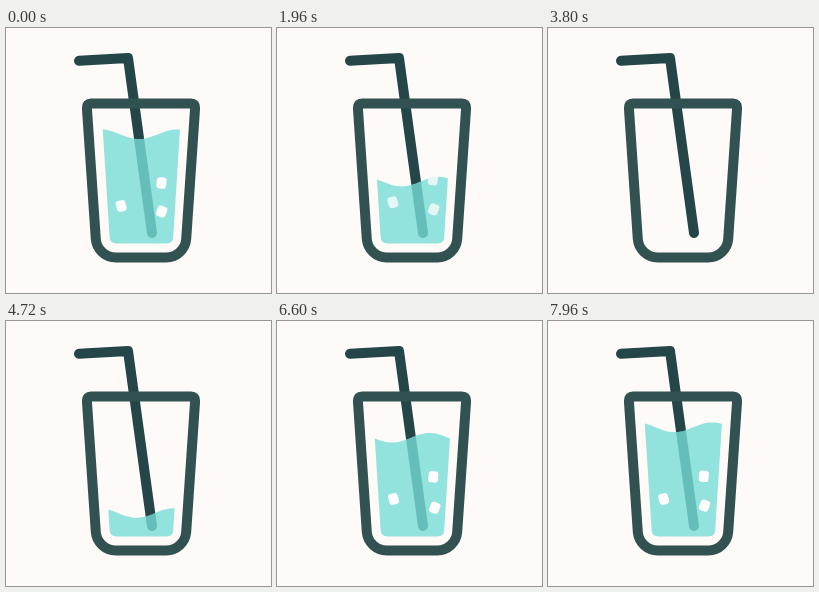
Recreate the animation shown at these times as an HTML page. Size 265 by 265 pixels, loop 8 s.

```html
<!DOCTYPE html>
<html lang="en">
<head>
<meta charset="utf-8">
<title>Drink</title>
<style>
  html, body { margin: 0; width: 100%; height: 100%; overflow: hidden; background: #fefaf7; }
  svg { display: block; width: 100%; height: 100%; }
</style>
</head>
<body>
<svg viewBox="0 0 265 265">
  <defs>
    <clipPath id="inside">
      <path d="M95.500 82H175.200L167.200 209Q167 215.500 160.500 215.500H110.500Q104 215.500 103.600 209Z"/>
    </clipPath>
    <clipPath id="wet"><path class="surface"/></clipPath>
  </defs>
  <path d="M73 32.800L122 29.900L146 205" fill="none" stroke="#254648" stroke-width="10" stroke-linecap="round" stroke-linejoin="round"/>
  <g clip-path="url(#inside)">
    <path class="surface" fill="#77ddd8" fill-opacity=".8"/>
    <g id="ice" fill="#fefefe" clip-path="url(#wet)"></g>
  </g>
  <path d="M85 75.500H185Q189.400 75.500 189.100 80L180.200 211A20 20 0 0 1 160.300 229.500H109.700A20 20 0 0 1 89.800 211L80.900 80Q80.600 75.500 85 75.500Z" fill="none" stroke="#315251" stroke-width="10"/>
</svg>
<script>
const LOOP = 8000;
const EMPTY_AT = 3820;   // moment between draining and filling
const SWING = 2500;      // period of the sloshing
const WAVELENGTH = 75;

const cubes = [
  { x: 156, y: 155.5, dx: -.5, dy: -.5, angle: 6 },
  { x: 116, y: 178, dx: -.8, dy: 0, angle: -15 },
  { x: 157, y: 185.5, dx: -1.3, dy: -2, angle: 21 }
];

const clamp = (v, lo, hi) => Math.min(hi, Math.max(lo, v));
const levelAt = t => clamp(228 - .04 * Math.abs(t - EMPTY_AT), 106.3, 222);
const swingAt = t => Math.cos(2 * Math.PI * t / SWING);

// A wave whose trough rocks from side to side.
function surfacePath(level, swing) {
  const trough = 122 + 11 * swing;
  let d = 'M90 240';
  for (let x = 90; x <= 180; x += 2) {
    const y = level + 4.8 * Math.cos(2 * Math.PI * (x - trough) / WAVELENGTH);
    d += `L${x} ${y.toFixed(2)}`;
  }
  return d + 'L180 240Z';
}

const surfaces = document.querySelectorAll('.surface');
const ice = document.getElementById('ice');
const blocks = cubes.map(() => {
  const r = document.createElementNS('http://www.w3.org/2000/svg', 'rect');
  const box = { x: -4.9, y: -5.6, width: 9.8, height: 11.2, rx: 3.2 };
  for (const k in box) r.setAttribute(k, box[k]);
  return ice.appendChild(r);
});

function draw(t) {
  const level = levelAt(t), swing = swingAt(t);
  const d = surfacePath(level, swing);
  surfaces.forEach(s => s.setAttribute('d', d));

  // Ice fades and lifts a little when the drink is shallow.
  const solid = clamp((172 - level) / 24, 0, 1);
  const lift = 16 * (1 - solid);
  ice.setAttribute('opacity', solid);
  cubes.forEach((c, i) => {
    const x = c.x + c.dx * swing, y = c.y + c.dy * swing - lift;
    blocks[i].setAttribute('transform', `translate(${x} ${y}) rotate(${c.angle})`);
  });
}

const start = performance.now();
function tick() {
  draw((performance.now() - start) % LOOP);
  requestAnimationFrame(tick);
}
tick();
</script>
</body>
</html>
```
